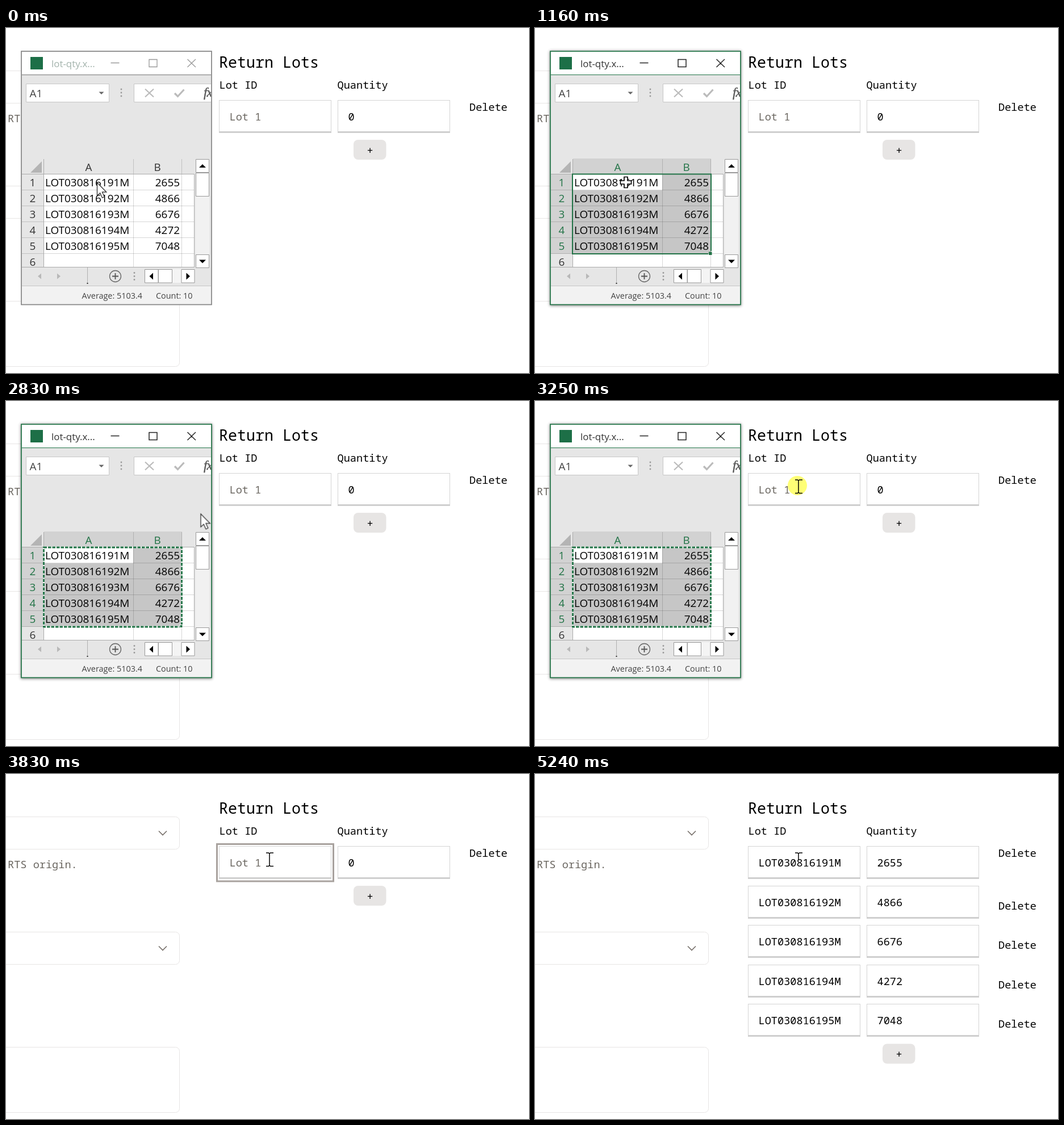
Animation, 921 px wide and 608 px high, one loop 6.8 s. Source, as an HTML page:

```html
<!DOCTYPE html>
<html lang="en">
<head>
<meta charset="utf-8">
<title>Paste lots from a spreadsheet</title>
<style>
html, body { margin: 0; width: 100%; height: 100%; overflow: hidden; background: #fff; }
svg { display: block; width: 921px; height: 608px; }
.mono { font: 18.6px "Noto Sans Mono", "DejaVu Sans Mono", monospace; white-space: pre; }
.ui { font: 18.9px "Open Sans", "Noto Sans", sans-serif; }
.h { font-size: 26.7px; }
.key { font-size: 43px; font-weight: 600; fill: #fff; }
.muted { fill: #6b6761; }
.mid { text-anchor: middle; }
.end { text-anchor: end; }
.title { font-size: 16.9px; stroke: none; }
.small { font-size: 14.4px; fill: #444; }
.fx { font: italic 23px "Liberation Serif", "Noto Serif", serif; letter-spacing: -1px; fill: #555; stroke: #555; stroke-width: .4; }
.line { fill: none; stroke: #e7e5e4; }
.field { fill: #fff; stroke: #d4d4d4; }
.btn { fill: #fff; stroke: #999; }
.grid { fill: none; stroke: #000; stroke-opacity: .16; }
.chev { fill: none; stroke: #78716c; stroke-width: 1.7; }
.beam { fill: none; stroke: #000; stroke-width: 1.5; }
.halo { fill: #fff75c; mix-blend-mode: multiply; }
.soft { fill: #ffff76; }

/* Timed visibility, one loop of 6.8 s */
[class*="t-"] { animation: 6.8s step-end infinite; }
.t-window { animation-name: window; }
.t-idle { animation-name: idle; }
.t-active { animation-name: active; }
.t-solid { animation-name: solid; }
.t-ants { animation-name: ants; }
.t-copy { animation-name: copy; }
.t-paste { animation-name: paste; }
.t-click1 { animation-name: click1; }
.t-click2 { animation-name: click2; }
.t-focus { animation-name: focus; }
.t-caret { animation-name: caret; }
.t-empty { animation-name: empty; }
.t-filled { animation-name: filled; }
.t-arrow { animation-name: arrow; }
.t-cross { animation-name: cross; }
.t-beam { animation-name: beam; }
@keyframes window { 0% { opacity: 1 } 48.382%, 100% { opacity: 0 } }
@keyframes idle { 0% { opacity: 1 } 14.558%, 100% { opacity: 0 } }
@keyframes active { 0% { opacity: 0 } 14.558%, 100% { opacity: 1 } }
@keyframes solid { 0% { opacity: 0 } 14.558% { opacity: 1 } 30.588%, 100% { opacity: 0 } }
@keyframes ants { 0% { opacity: 0 } 30.588%, 100% { opacity: 1 } }
@keyframes copy { 0% { opacity: 0 } 30.588% { opacity: 1 } 37.941%, 100% { opacity: 0 } }
@keyframes paste { 0% { opacity: 0 } 64.264% { opacity: 1 } 77.058%, 100% { opacity: 0 } }
@keyframes click1 { 0% { opacity: 0 } 14.558% { opacity: 1 } 17.058%, 100% { opacity: 0 } }
@keyframes click2 { 0% { opacity: 0 } 47.794% { opacity: 1 } 49.558%, 100% { opacity: 0 } }
@keyframes focus { 0% { opacity: 0 } 48.382% { opacity: 1 } 64.999%, 100% { opacity: 0 } }
@keyframes caret { 0% { opacity: 0 } 48.382% { opacity: 1 } 56.323%, 100% { opacity: 0 } }
@keyframes empty { 0% { opacity: 1 } 64.999%, 100% { opacity: 0 } }
@keyframes filled { 0% { opacity: 0 } 64.999%, 100% { opacity: 1 } }
@keyframes arrow { 0% { opacity: 1 } 14.558% { opacity: 0 } 41.372% { opacity: 1 } 42.058%, 100% { opacity: 0 } }
@keyframes cross { 0% { opacity: 0 } 14.558% { opacity: 1 } 41.372%, 100% { opacity: 0 } }
@keyframes beam { 0% { opacity: 0 } 42.058% { opacity: 1 } 64.999%, 100% { opacity: 0 } }

/* Ten mouse steps, slow at both ends */
#pointer { animation: travel 6.8s step-end infinite; }
@keyframes travel {
  0% { transform: translate(160px, 272px) }
  37.941% { transform: translate(160px, 272px); animation-timing-function: steps(3, jump-start) }
  40% { transform: translate(206px, 254px); animation-timing-function: steps(4, jump-start) }
  42.745% { transform: translate(388px, 180px); animation-timing-function: steps(3, jump-start) }
  44.804%, 100% { transform: translate(464px, 150px) }
}
</style>
</head>
<body>
<svg viewBox="0 0 921 608">
  <defs>
    <filter id="shadow" x="-10%" y="-10%" width="120%" height="120%">
      <feGaussianBlur stdDeviation="2.6"/>
    </filter>
    <clipPath id="frame"><rect x="28" y="41" width="333" height="446"/></clipPath>
    <clipPath id="sheet"><rect x="28" y="229" width="304" height="192"/></clipPath>
  </defs>

  <!-- Page behind -->
  <g class="line">
    <rect x="-20.5" y="75.5" width="326" height="57" rx="7"/>
    <rect x="-20.5" y="278.5" width="326" height="57" rx="7"/>
    <rect x="-20.5" y="481.5" width="326" height="115" rx="7"/>
  </g>
  <path class="chev" d="M269 100.5l7 7 7-7M269 303.5l7 7 7-7"/>
  <text class="mono muted" x="3" y="166">RTS origin.</text>

  <!-- Form -->
  <g class="mono">
    <text class="h" x="375" y="70">Return Lots</text>
    <text x="375.5" y="106.5">Lot ID</text>
    <text x="583.5" y="106.5">Quantity</text>
    <g class="t-empty">
      <g id="blank"></g>
      <text class="muted" x="393.5" y="162.5">Lot 1</text>
      <text x="602.5" y="162.5">0</text>
      <rect x="612" y="197" width="57.5" height="35" rx="8" fill="#e7e5e4"/>
      <text class="mid" x="641" y="221.5">+</text>
    </g>
    <rect class="t-focus" x="371.5" y="123.5" width="205" height="65.5" fill="none" stroke="#a8a29e" stroke-width="3"/>
    <rect class="t-caret" x="394" y="144" width="1" height="23"/>
    <g class="t-filled">
      <g id="rows"></g>
      <rect x="612" y="475.5" width="57.5" height="35" rx="8" fill="#e7e5e4"/>
      <text class="mid" x="641" y="500">+</text>
      <path class="beam" d="M458 139h4.5l1.5 1.5 1.5-1.5h5.5M464 140v11"/>
    </g>
  </g>

  <!-- Spreadsheet window -->
  <g class="t-window">
    <g class="t-active">
      <rect x="26" y="40.5" width="337" height="449" fill="#000" fill-opacity=".5" filter="url(#shadow)"/>
    </g>
    <rect x="27" y="40" width="335" height="448" fill="#e6e6e6"/>
    <g class="ui" clip-path="url(#frame)">
      <rect x="27" y="41" width="335" height="41" fill="#fff"/>
      <rect x="43" y="51" width="22" height="22" fill="#1d6f47"/>
      <g class="t-idle" stroke="#999" fill="none" stroke-width="1.3">
        <text class="title" x="80" y="69" fill="#a3b3ac">lot-qty.x...</text>
        <path d="M184.5 61.500h15M252 55.500h14v13h-14zM319.500 55l14.500 14M334 55l-14.500 14"/>
        <path d="M27 82.500h335"/>
      </g>
      <g class="t-active" stroke="#222" fill="none" stroke-width="1.500">
        <text class="title" x="80" y="69" fill="#333">lot-qty.x...</text>
        <path d="M184.500 61.500h15M252 55.500h14v13h-14zM319.500 55l14.500 14M334 55l-14.500 14"/>
        <path d="M27 82.500h335" stroke="#217346" stroke-width="1"/>
      </g>
      <path d="M35.500 98.500h146v32h-146zM225.500 98.500h146v32h-146z" fill="#fff" stroke="#c6c6c6"/>
      <text x="41.500" y="122" fill="#444">A1</text>
      <path d="M163.500 112.500h9l-4.500 4.500z" fill="#666"/>
      <g fill="#999" id="dots"></g>
      <path d="M245 107.500l15 14M260 107.500l-15 14" stroke="#bbb" stroke-width="2.200"/>
      <path d="M297 115l5.500 5.500 11-12" fill="none" stroke="#bbb" stroke-width="3.200"/>
      <text class="fx" x="348" y="121">fx</text>

      <!-- Cells -->
      <g clip-path="url(#sheet)">
        <rect x="66" y="257" width="266" height="170" fill="#fff"/>
        <path d="M43 255h20v-20z" fill="#b4b4b4"/>
        <g class="t-active">
          <path d="M67 230h243v27H67zM28 258h38v140H28z" fill="#d2d2d2"/>
          <path d="M67 258h243v140H67z" fill="#c6c6c6"/>
          <path d="M67 258h157v28H67z" fill="#fff"/>
        </g>
        <path class="grid" id="lines"/>
        <path d="M28 257.500h304M66.500 231v192" stroke="#aaa" fill="none"/>
        <g id="cells"></g>
      </g>
      <path d="M331.500 257v165" stroke="#aaa"/>

      <!-- Scroll bars, tabs and status -->
      <rect x="334" y="231" width="24" height="192" fill="#f1f1f1"/>
      <path class="btn" d="M334.500 231.500h23v23h-23zM334.500 255.500h23v41h-23zM334.500 399.500h23v23h-23z"/>
      <path d="M340 246l6-6 6 6zM340 408.500l6 6 6-6z"/>
      <path d="M28 421.500h304" stroke="#aaa"/>
      <path d="M143.500 422v27" stroke="#b0b0b0"/>
      <rect x="142.500" y="449" width="2" height="2" fill="#333"/>
      <path d="M62 432.500v10l-6-5zM90 432.500v10l6-5z" fill="#b8b8b8"/>
      <circle cx="192.500" cy="437.500" r="10" fill="none" stroke="#666" stroke-width="1.300"/>
      <path d="M187 437.500h11M192.500 432v11" stroke="#555" stroke-width="1.800"/>
      <rect x="268" y="425" width="41" height="24" fill="#f4f4f4"/>
      <path class="btn" d="M244.500 425.500h23.500v23.500h-23.500zM268.500 425.500h24v23.500h-24zM309 425.500h23v23.500h-23z"/>
      <path d="M259 431.500v12l-6.500-6zM317.500 431.500v12l6.500-6z"/>
      <rect x="27" y="455" width="335" height="33" fill="#f2f2f2"/>
      <path d="M27 454.500h335" stroke="#c6c6c6"/>
      <text class="small" x="133.500" y="476.500">Average: 5103.4</text>
      <text class="small" x="264" y="476.500">Count: 10</text>
    </g>

    <!-- Selection -->
    <g class="t-solid" fill="none" stroke="#217346" stroke-width="2">
      <path d="M305 398H66V257.500h244V393"/>
      <rect x="306" y="394.500" width="5.500" height="5.500" fill="#217346" stroke="none"/>
    </g>
    <g class="t-ants" fill="none" stroke-width="2.800">
      <path d="M66.500 258h243v140h-243z" stroke="#fff"/>
      <path d="M66.500 258h243v140h-243z" stroke="#217346" stroke-dasharray="5.500 2"/>
      <rect x="306" y="394.500" width="5" height="5" fill="#217346" stroke="#fff" stroke-width="1"/>
    </g>
    <rect class="t-idle" x="27" y="41" width="335" height="446.500" fill="none" stroke="#858585" stroke-width="1.700"/>
    <rect class="t-active" x="27" y="41" width="335" height="446.500" fill="none" stroke="#217346" stroke-width="1.700"/>
  </g>

  <!-- Key badges -->
  <g class="mono t-copy">
    <rect x="346.500" y="545" width="231" height="62.500" fill="#111827"/>
    <text class="key" x="358" y="592.500">Ctrl + C</text>
  </g>
  <g class="mono t-paste">
    <rect x="345.500" y="545" width="232" height="62.500" fill="#111827"/>
    <text class="key" x="358" y="592.500">Ctrl + V</text>
  </g>

  <g id="pointer">
    <path class="t-arrow" d="M.5 .5v23l5.200-4.800 3.800 8.500 3.800-1.700-3.800-8.300h7.300z" fill="#fff" stroke="#222" stroke-width="1.200"/>
    <path class="t-cross" d="M-3-9.500h6v6.500h6.500v6H3v6.500h-6V3h-6.500v-6H-3z" fill="#fff" stroke="#000" stroke-width="1.700"/>
    <path class="beam t-beam" d="M-6-11h4.500l1.500 1.500 1.500-1.500H7M0-10V11.500M-6 12.500h4.500l1.500-1.500 1.500 1.500H7"/>
  </g>
  <circle class="halo t-click1" cx="159.500" cy="272.500" r="17"/>
  <circle class="halo soft t-click2" cx="462" cy="149" r="17"/>
</svg>
<script>
const qty = [2655, 4866, 6676, 4272, 7048];
const lot = i => `LOT03081619${i + 1}M`;
const put = (id, html) => { document.getElementById(id).innerHTML = html; };
const text = (x, y, s, cls = "", fill = "#000") => `<text x="${x}" y="${y}" class="${cls}" fill="${fill}">${s}</text>`;

// Two input boxes and the delete link of one form row
const PITCH = 69.6;
const box = (x, y) => `<rect class="field" x="${x}" y="${y}" width="197" height="56"/>
  <rect x="${x - 0.5}" y="${y + 54.5}" width="198" height="3" fill="#cfcfcf"/>`;
const row = i => {
  const y = Math.round(i * PITCH);
  return box(375.5, y + 127.5) + box(584.5, y + 127.5) +
    text(816, y + (i ? 169 : 146), "Delete");
};
put("blank", row(0));
put("rows", qty.map((n, i) => {
  const y = 162.5 + Math.round(i * PITCH);
  return row(i) + text(393.5, y, lot(i)) + text(602.5, y, n);
}).join(""));

// Sheet contents; headings of selected cells turn green
const label = (x, y, s) => text(x, y, s, "mid", "#333");
const heading = (x, y, s) => text(x, y, s, "mid t-idle", "#333") + text(x, y, s, "mid t-active", "#217346");
let cells = heading(145.5, 252, "A") + heading(266.5, 252, "B") + label(47, 419, 6);
qty.forEach((n, i) => {
  const y = 279 + i * 28;
  cells += heading(47, y, i + 1) + text(69, y, lot(i)) + text(306, y, n, "end");
});
put("cells", cells);

let lines = "M224.5 231v192M309.5 231v192";
for (let i = 1; i < 6; i++) lines += `M28 ${257.5 + i * 28}h304`;
document.getElementById("lines").setAttribute("d", lines);

const dots = (x, y) => [-6, 0, 6].map(d => `<circle cx="${x}" cy="${y + d}" r="1.4"/>`).join("");
put("dots", dots(203, 114) + dots(226, 437.5));
</script>
</body>
</html>
```
